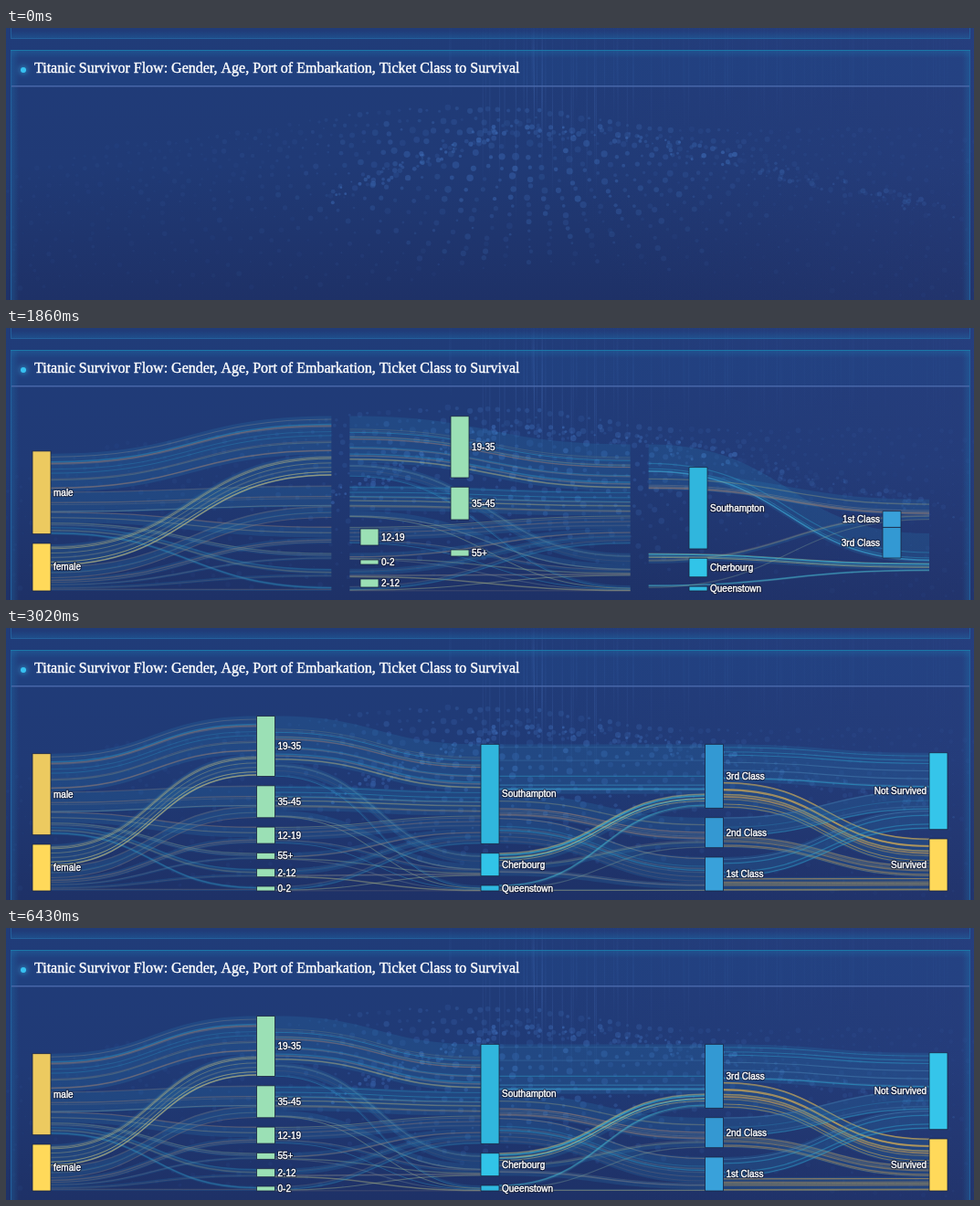
Animation of 1060 by 298 pixels, one loop 7770 ms. Source, as an HTML page with a canvas:

```html
<!DOCTYPE html>
<html lang="en">
<head>
<meta charset="utf-8">
<title>Survivor flow</title>
<style>
html, body { margin: 0; width: 100%; height: 100%; overflow: hidden; background: #203a78; }
canvas { display: block; }
</style>
</head>
<body>
<canvas id="stage" width="1060" height="298"></canvas>
<script>
const W = 1060, H = 298, LOOP = 7770, NODE_W = 20, FLOOR = 288;
const ctx = document.getElementById('stage').getContext('2d');
const SANS = '"Liberation Sans", Arial, sans-serif';

// Moments at which the picture may change.
const steps = (from, to, count) =>
  Array.from({ length: count }, (_, i) => from + (to - from) * i / (count - 1));
const TICKS = [0, 720, 900, 1030, 1170, 1310, ...steps(1470, 2120, 6), ...steps(2250, 3020, 7),
  3890, ...steps(4480, 5130, 6), 5260, ...steps(5660, 6430, 7)];

const clamp = v => Math.max(0, Math.min(1, v));
const mix = (a, b, u) => a + (b - a) * u;

function seeded(seed) {
  return () => {
    seed = (seed + 0x6D2B79F5) | 0;
    let v = Math.imul(seed ^ (seed >>> 15), 1 | seed);
    v = (v + Math.imul(v ^ (v >>> 7), 61 | v)) ^ v;
    return ((v ^ (v >>> 14)) >>> 0) / 4294967296;
  };
}

// Piecewise linear path through [key, ...values] points.
function along(points, key) {
  let i = 1;
  while (i < points.length - 1 && points[i][0] < key) i++;
  const a = points[i - 1], b = points[i], u = clamp((key - a[0]) / (b[0] - a[0]));
  return a.slice(1).map((v, k) => mix(v, b[k + 1], u));
}

// ---------- backdrop ----------
function makeBackdrop() {
  const canvas = document.createElement('canvas');
  canvas.width = W; canvas.height = H;
  const g = canvas.getContext('2d'), rnd = seeded(7);
  const gradient = (x0, y0, x1, y1, ...colors) => {
    const fill = g.createLinearGradient(x0, y0, x1, y1);
    colors.forEach((c, i) => fill.addColorStop(i / (colors.length - 1), c));
    return fill;
  };
  const rect = (x, y, w, h, fill) => { g.fillStyle = fill; g.fillRect(x, y, w, h); };
  const dot = (x, y, r, alpha) => {
    g.fillStyle = `rgba(64,112,188,${alpha})`;
    g.beginPath(); g.arc(x, y, r, 0, 7); g.fill();
  };

  rect(0, 0, W, H, gradient(0, 0, 0, H, '#203c79', '#203a76', '#1e3167'));
  rect(0, 0, W, H, gradient(650, 250, 1060, 0, 'rgba(60,72,145,0)', 'rgba(60,72,145,.2)'));

  for (let i = 0; i < 90; i++) {
    const x = 480 + rnd() * 560, near = Math.exp(-(((x - 585) / 110) ** 2));
    const end = 70 + rnd() * (40 + 110 * near);
    rect(x, 0, 1, end, gradient(0, 0, 0, end,
      'rgba(80,125,205,.02)', `rgba(80,125,205,${0.05 + near * 0.13})`, 'rgba(80,125,205,0)'));
  }
  for (let row = 0; row < 17; row++) {
    for (let k = -42; k <= 42; k++) {
      const x = 570 + k * (11 + row * 0.9) + rnd() * 5;
      const y = 90 + row * 10.5 + Math.sin(x / 95 + row * 0.25) * 9 + Math.abs(x - 570) * 0.06 + rnd() * 5;
      const near = Math.exp(-(((x - 560) / 210) ** 2) - ((y - 150) / 90) ** 2);
      dot(x, y, 0.8 + rnd() * 2.2 + near, (0.09 + near * 0.42) * (0.35 + rnd() * 0.65));
    }
  }
  const ridge = [[350, 187], [440, 150], [560, 104], [700, 124], [1050, 205]];
  for (let i = 0; i < 200; i++) {
    const x = 350 + rnd() * 690, [y] = along(ridge, x);
    dot(x, y + (rnd() - 0.5) * 18, 1 + rnd() * 2, (0.15 + rnd() * 0.4) * (x < 800 ? 1 : 0.5));
  }

  // Frame with an inner glow along each edge.
  const glow = 'rgba(30,115,175,.32)', clear = 'rgba(30,115,175,0)';
  rect(6, 25, 1049, 39, 'rgba(35,75,145,.28)');
  rect(6, 25, 1049, 8, gradient(0, 25, 0, 33, glow, clear));
  rect(6, 3, 1049, 8, gradient(0, 11, 0, 3, glow, clear));
  rect(6, 25, 8, H, gradient(6, 0, 14, 0, glow, clear));
  rect(1047, 25, 8, H, gradient(1055, 0, 1047, 0, glow, clear));
  g.strokeStyle = '#23609c';
  g.strokeRect(5.5, -5, 1050, 16.5);
  g.strokeRect(5.5, 24.5, 1050, 290);
  rect(5, 24, 1051, 1, '#1c78a8');
  rect(6, 63, 1049, 1.5, '#4766a8');

  g.shadowColor = '#35c0f0'; g.shadowBlur = 6;
  g.fillStyle = '#37c2f2';
  g.beginPath(); g.arc(19, 46, 3, 0, 7); g.fill();
  g.shadowBlur = 0;
  g.fillStyle = g.strokeStyle = '#fff';
  g.lineWidth = 0.4;
  g.font = '16px "Liberation Serif", Times, serif';
  const title = 'Titanic Survivor Flow: Gender, Age, Port of Embarkation, Ticket Class to Survival';
  g.fillText(title, 31, 49);
  g.strokeText(title, 31, 49);
  return canvas;
}
const backdrop = makeBackdrop();

// ---------- nodes ----------
const node = (label, size, color) => ({ label, size, color });
const age = (label, size) => node(label, size, '#9be0b5');
const columns = [
  [node('male', 89, '#ecca60'), node('female', 51, '#ffd95a')],
  [age('19-35', 66), age('35-45', 35), age('12-19', 18), age('55+', 7), age('2-12', 9), age('0-2', 5)],
  [node('Southampton', 109, '#30b6dd'), node('Cherbourg', 25, '#31c4e8'), node('Queenstown', 6, '#2fb8e0')],
  [node('3rd Class', 70, '#3399d3'), node('2nd Class', 33, '#3498d2'), node('1st Class', 37, '#39a1da')],
  [node('Not Survived', 84, '#35c5ea'), node('Survived', 57, '#ffd95a')],
];
const [genders, ages, ports, classes] = columns;
const TOTAL = 140.5;
const columnX = (c, count) => mix(29, 1011, c / (count - 1));

// Piles nodes upwards from a bottom edge; a pose is [x, top, height, opacity].
function stack(list, x, { bottom = FLOOR, gap = 10.3, scale = 1, alpha = 1 } = {}) {
  const poses = new Map();
  for (const n of [...list].reverse()) {
    const height = n.size * scale;
    poses.set(n, [x, bottom - height, height, alpha]);
    bottom -= height + gap;
  }
  return poses;
}
const stage = (...stacks) => new Map(stacks.flatMap(s => [...s]));
const pick = (list, ...labels) => labels.map(label => list.find(n => n.label === label));

const home = stage(...columns.map((list, c) => stack(list, columnX(c, 5))));
const away = stage(
  stack(genders, 29, { scale: 1.1 }),
  stack(pick(ages, '19-35', '35-45', '55+'), 939, { bottom: 239, scale: 1.1, gap: 11.5 }),
  stack(pick(ages, '0-2', '12-19', '2-12'), 500, { bottom: 272, gap: 8 }),
  stack(ports, 970, { scale: 0.2 }),
  stack(classes, 782, { alpha: 0.14 }));
const back = stage(
  stack(genders, 29, { scale: 1.02 }),
  stack(pick(ages, '19-35', '35-45'), 487, { bottom: 210, scale: 1.02 }),
  stack(pick(ages, '55+'), 487, { bottom: 250 }),
  stack(pick(ages, '12-19', '0-2', '2-12'), 388, { bottom: 284, gap: 16 }),
  stack(ports, 748, { scale: 0.82 }),
  stack(pick(classes, '1st Class', '3rd Class'), 960, { bottom: 252, scale: 0.48, gap: 0 }));

// A node missing from a stage rests unseen at its home place.
const poseIn = (poses, n) => poses.get(n) || [...home.get(n).slice(0, 3), 0];

function poseAt(n, t) {
  const blend = (from, to, u) => poseIn(from, n).map((v, i) => mix(v, poseIn(to, n)[i], clamp(u)));
  if (t <= 720) return home.get(n);
  if (t <= 1310) return blend(home, away, (t - 720) / 590);
  if (t <= 1860) return blend(away, back, (t - 1310) / 550);
  return blend(back, home, 1 - (1 - clamp((t - 1860) / 600)) ** 3);
}

function drawLabel(text, x, y, align) {
  ctx.font = '10px ' + SANS;
  ctx.textAlign = align;
  ctx.lineJoin = 'round';
  ctx.strokeStyle = 'rgba(15,20,40,.65)'; ctx.lineWidth = 2.5;
  ctx.strokeText(text, x, y);
  ctx.strokeStyle = ctx.fillStyle = '#fff'; ctx.lineWidth = 0.4;
  ctx.strokeText(text, x, y);
  ctx.fillText(text, x, y);
  ctx.textAlign = 'left';
}

function drawNodes(t) {
  const wide = t >= 1030 && t < 2250;
  columns.forEach((list, c) => list.forEach(n => {
    const [x, top, height, alpha] = poseAt(n, t);
    ctx.globalAlpha = alpha;
    ctx.fillStyle = n.color;
    ctx.fillRect(x, top, NODE_W, height);
    ctx.strokeStyle = '#1b2440'; ctx.lineWidth = 0.8;
    ctx.strokeRect(x, top, NODE_W, height);
    const left = c === 4 || (wide && c === 3);
    drawLabel(n.label, left ? x - 3 : x + NODE_W + 3, top + height / 2 + 3.5, left ? 'right' : 'left');
  }));
  ctx.globalAlpha = 1;
}

// ---------- links ----------
const style = (density, strength, ...colors) => ({ density, strength, colors });
const MIXED = style(0.26, 0.36, '#a08072', '#a08072', '#93908c', '#c9c27a', '#2fb0d8');
const KHAKI = style(0.4, 0.5, '#cbc57c', '#cbc57c', '#8d9486');
const AQUA = style(0.6, 0.6, '#cbc57c', '#3cc0dc', '#6fc0b8');
const BLUE = style(0.16, 0.5, '#2fb0d8', '#4a86b8');
const GOLD = style(0.5, 0.55, '#e0b650', '#c79a55');

function styleFor(gap, from, to) {
  if (gap === 3) return to ? GOLD : BLUE;
  if (gap === 2 && to === 0) return from ? AQUA : BLUE;
  return gap === 0 && from === 1 && to === 0 ? KHAKI : MIXED;
}

// Every node sends a share to each node of the next column, in proportion to both sizes.
function linksBetween(gap, poses = home, scale = 1) {
  const targets = columns[gap + 1].filter(n => poses.has(n));
  const arrivals = targets.map(n => poses.get(n)[1]);
  return columns[gap].flatMap((source, from) => {
    let y0 = home.get(source)[1];
    return targets.map((target, to) => {
      const size = source.size * target.size / TOTAL * scale;
      const link = { from, y0, y1: arrivals[to], size, seed: gap * 97 + from * 13 + to + 5, ...styleFor(gap, from, to) };
      y0 += size;
      arrivals[to] += size;
      return link;
    });
  });
}
const gaps = [0, 1, 2, 3].map(gap => linksBetween(gap));
const classLinks = linksBetween(2,
  stack(pick(classes, '3rd Class', '1st Class').reverse(), 1011, { bottom: 267, scale: 0.6, gap: 15 }), 0.6);

function drawLinks(links, x0, x1, opacity) {
  if (opacity <= 0) return;
  const start = x0 + NODE_W, mid = (start + x1) / 2;
  for (const { y0, y1, size, seed, density, strength, colors } of links) {
    const rnd = seeded(seed);
    ctx.globalAlpha = opacity * 0.2;
    ctx.fillStyle = '#2a84b8';
    ctx.beginPath();
    ctx.moveTo(start, y0);
    ctx.bezierCurveTo(mid, y0, mid, y1, x1, y1);
    ctx.lineTo(x1, y1 + size);
    ctx.bezierCurveTo(mid, y1 + size, mid, y0 + size, start, y0 + size);
    ctx.fill();
    for (let i = Math.ceil(size * density); i > 0; i--) {
      const d = rnd() * size;
      ctx.strokeStyle = colors[Math.floor(rnd() * colors.length)];
      ctx.globalAlpha = opacity * strength * (0.4 + rnd() * 0.7);
      ctx.lineWidth = 0.7 + rnd() * 0.9;
      ctx.beginPath();
      ctx.moveTo(start, y0 + d);
      ctx.bezierCurveTo(mid, y0 + d, mid, y1 + d, x1, y1 + d);
      ctx.stroke();
    }
  }
  ctx.globalAlpha = 1;
}

function drawAllLinks(t) {
  const full = t < 2250 ? clamp((1170 - t) / 450) : clamp((t - 2420) / 600);
  gaps.forEach((links, gap) => drawLinks(links, columnX(gap, 5), columnX(gap + 1, 5), full));
  const fade = clamp((2400 - t) / 280);
  const drawWide = (gap, links, opacity) =>
    drawLinks(links, columnX(gap, 4), columnX(gap + 1, 4), clamp(opacity) * fade);
  drawWide(0, gaps[0], (t - 900) / 350);
  drawWide(1, t < 1700 ? gaps[1].filter(l => l.from === 2 || l.from >= 4) : gaps[1], (t - 1100) / 200);
  drawWide(2, classLinks, (t - 1290) / 500);
}

// ---------- overlays ----------
const CURSOR = [[4480, 420, 20], [4740, 358, 193], [5000, 358, 193], [5660, 372, 186], [6300, 422, -40]];

function drawButtonTip() {
  ctx.fillStyle = '#f4f4f4';
  ctx.fillRect(408, 0, 32, 7);
  ctx.fillStyle = '#222';
  ctx.font = '12px "Noto Sans CJK SC", "Noto Sans CJK", sans-serif';
  ctx.fillText('停止', 412, 3);
}

function drawToolbar() {
  ctx.fillStyle = 'rgba(22,32,68,.72)';
  ctx.fillRect(882, 84, 152, 19);
  ctx.strokeStyle = ctx.fillStyle = '#6c7896';
  ctx.fill(new Path2D('M894 90h4v-2h7v2h5v10h-16zM905 95a3 3 0 1 0 -6 0a3 3 0 1 0 6 0'), 'evenodd');
  ctx.lineWidth = 1.5;
  ctx.setLineDash([2, 2]);
  ctx.strokeRect(927, 87, 14, 14);
  ctx.setLineDash([]);
  ctx.beginPath();
  ctx.ellipse(958, 92, 7, 4.5, -0.3, 0, 7);
  ctx.moveTo(953, 95); ctx.quadraticCurveTo(957, 97, 953, 101);
  ctx.stroke();
  ctx.fill(new Path2D('M982 94l8-7 8 7h-2v7h-4v-4h-4v4h-4v-7z'));
  ctx.fillStyle = '#0c1228';
  ctx.fillRect(1014, 86, 16, 16);
}

function drawHover() {
  ctx.fillStyle = 'rgba(45,170,212,.88)';
  ctx.fill(new Path2D('M408 187l6-5v-14h122v38H414v-14z'));
  ctx.font = '13px ' + SANS;
  ctx.fillStyle = '#3d4650';
  ctx.fillText('source: 35-45', 416, 183);
  ctx.fillText('target: Southampton', 416, 200);
  ctx.fillStyle = 'rgba(205,212,222,.93)';
  ctx.fillRect(538, 167, 30, 40);
  ctx.fillStyle = '#111';
  ctx.fillText('21.0', 540, 183);
}

function drawCursor(t) {
  const [x, y] = along(CURSOR, t);
  ctx.strokeStyle = '#e0242c'; ctx.lineWidth = 3;
  ctx.beginPath(); ctx.arc(x, y + 1, 21.5, 0, 7); ctx.stroke();
  ctx.save();
  ctx.translate(x, y);
  const arrow = new Path2D('M0 0v14l3.2-3 2.6 6 2.6-1.2-2.6-5.6H10z');
  ctx.strokeStyle = '#fff'; ctx.lineWidth = 2;
  ctx.stroke(arrow);
  ctx.fillStyle = '#111';
  ctx.fill(arrow);
  ctx.restore();
}

function draw(t) {
  ctx.drawImage(backdrop, 0, 0);
  if (t < 720) return;
  ctx.save();
  ctx.beginPath(); ctx.rect(16, 66, 1020, 227); ctx.clip();
  drawAllLinks(t);
  drawNodes(t);
  ctx.restore();
  if (t >= 3890 && t < 5130) drawButtonTip();
  if (t >= 4610 && t < 6100) drawToolbar();
  if (t >= 4740 && t < 5660) drawHover();
  if (t >= 4480 && t < 6300) drawCursor(t);
}

let shown = -1;
function play() {
  const now = performance.now() % LOOP;
  const tick = TICKS.filter(t => t <= now).pop();
  if (tick !== shown) draw(shown = tick);
  requestAnimationFrame(play);
}
play();
</script>
</body>
</html>
```
